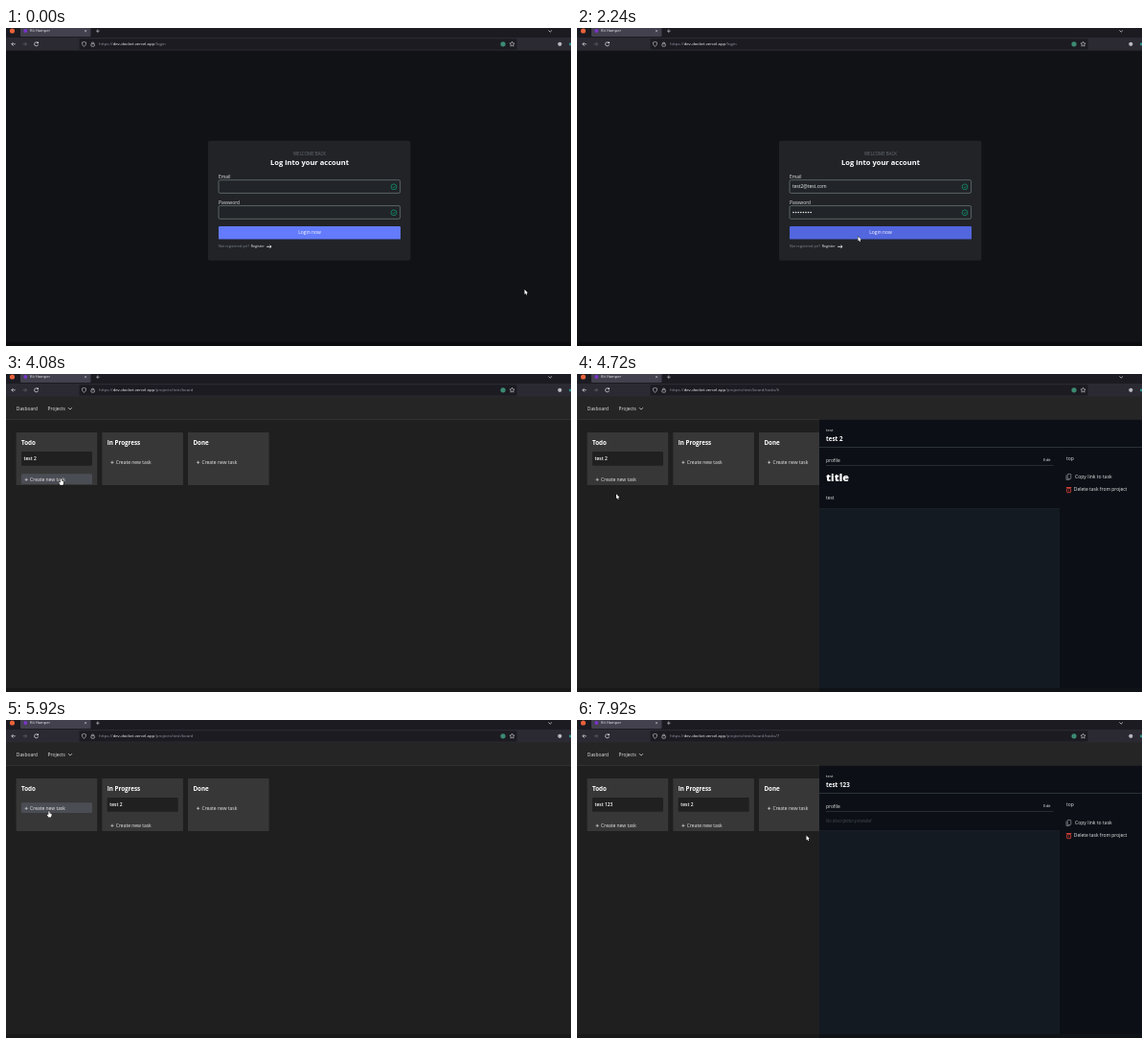
These frames come from a looping animation (590x332 px, 8000 ms). An HTML page with a canvas:

```html
<!DOCTYPE html>
<html lang="en">
<head>
<meta charset="utf-8">
<title>Task board demo</title>
<style>
  html, body { margin: 0; width: 100%; height: 100%; overflow: hidden; background: #111216; }
  canvas { display: block; width: 590px; height: 332px; }
</style>
</head>
<body>
<canvas id="stage"></canvas>
<script>
const W = 590, H = 332, LOOP = 8000, STEP = 80;
const canvas = document.getElementById('stage');
const c = canvas.getContext('2d');
const ratio = window.devicePixelRatio || 1;
canvas.width = W * ratio;
canvas.height = H * ratio;

const FONT = '"Open Sans", "Noto Sans", sans-serif';
const BASE = 4.92;

// Pointer path: time, x, y
const PATH = [
  [0, 541.5, 273], [80, 541.5, 273], [560, 315, 165], [1400, 315, 165],
  [1720, 300, 207], [1920, 293.5, 217.5], [3000, 293.5, 217.5],
  [3440, 58, 93], [3640, 58, 93], [3920, 57.5, 109.5], [4240, 57.5, 109.5],
  [4440, 45, 88], [4560, 45, 88], [4720, 41, 125.2], [5200, 41, 125.2],
  [5440, 42, 88], [5680, 131, 88], [5760, 131, 88], [5920, 45, 95.2],
  [7200, 45, 95.2], [7360, 45, 88], [7520, 45, 88], [7840, 239.5, 120.5], [8000, 239.5, 120.5]
];

const EMAIL = 'test2@test.com';
const NEW_TASK = 'test 123';

const between = (t, a, b) => t >= a && t < b;
const ease = k => k * k * (3 - 2 * k);
const typed = (s, t, start, gap) =>
  s.slice(0, Math.max(0, Math.min(s.length, Math.floor((t - start) / gap) + 1)));

function pointerAt(t) {
  const i = Math.max(1, PATH.findIndex(p => p[0] > t));
  const [t0, x0, y0] = PATH[i - 1], [t1, x1, y1] = PATH[i];
  const k = ease((t - t0) / (t1 - t0));
  return [x0 + (x1 - x0) * k, y0 + (y1 - y0) * k];
}

function rect(x, y, w, h, fill) {
  c.fillStyle = fill;
  c.fillRect(x, y, w, h);
}

function round(x, y, w, h, r, fill, stroke, line = 0.7) {
  c.beginPath();
  c.roundRect(x, y, w, h, r);
  if (fill) { c.fillStyle = fill; c.fill(); }
  if (stroke) { c.strokeStyle = stroke; c.lineWidth = line; c.stroke(); }
}

function circle(x, y, r, fill, stroke, line = 0.7) {
  round(x - r, y - r, 2 * r, 2 * r, r, fill, stroke, line);
}

function lines(points, color, width = 0.7) {
  c.beginPath();
  for (let i = 0; i < points.length; i += 2) c.lineTo(points[i], points[i + 1]);
  c.strokeStyle = color;
  c.lineWidth = width;
  c.stroke();
}

// y is the vertical centre of the lowercase letters; returns the end x
function text(s, x, y, { size = BASE, weight = 400, color = '#e8e8e8', align = 'left', style = '' } = {}) {
  c.font = `${style} ${weight} ${size}px ${FONT}`;
  c.textAlign = align;
  c.textBaseline = 'alphabetic';
  c.fillStyle = color;
  c.fillText(s, x, y + size * 0.32);
  return x + c.measureText(s).width;
}

function arc(x, y, r, from, to, color, width) {
  c.beginPath();
  c.arc(x, y, r, from, to);
  c.strokeStyle = color;
  c.lineWidth = width;
  c.stroke();
}

function browser(path) {
  rect(0, 0, W, 10, '#1c1b22');
  rect(0, 10, W, 13.5, '#2b2a33');
  round(15, -3, 73.5, 12, 1.2, '#42414d');
  circle(6.5, 3, 2.6, '#e8623a');
  circle(20.3, 3, 2, '#7a35c9');
  text('Kit Hamper', 25, 3.2, { size: 4, color: '#f0f0f4' });
  lines([82, 2, 84.2, 4.2], '#d0d0d8', 0.5);
  lines([84.2, 2, 82, 4.2], '#d0d0d8', 0.5);
  lines([94, 3.2, 97.6, 3.2], '#d0d0d8', 0.6);
  lines([95.8, 1.4, 95.8, 5], '#d0d0d8', 0.6);
  lines([566.4, 2.4, 568.2, 4.2, 570, 2.4], '#e0e0e6', 0.7);

  lines([9.8, 16.8, 5.8, 16.8], '#e6e6ec');
  lines([7.6, 15, 5.8, 16.8, 7.6, 18.6], '#e6e6ec');
  lines([17.8, 16.8, 21.4, 16.8], '#696874');
  lines([19.8, 15, 21.6, 16.8, 19.8, 18.6], '#696874');
  arc(31.6, 16.8, 2, 0.2, 5.3, '#e6e6ec', 0.7);
  rect(32.4, 14.6, 1.6, 1.5, '#e6e6ec');

  round(76.5, 11.3, 457, 11.2, 1.2, '#1c1b22');
  c.beginPath();
  c.moveTo(81.5, 14.4);
  c.lineTo(83.7, 15.2);
  c.quadraticCurveTo(83.6, 18.3, 81.5, 19.4);
  c.quadraticCurveTo(79.4, 18.3, 79.3, 15.2);
  c.closePath();
  c.strokeStyle = '#d6d6dc';
  c.lineWidth = 0.6;
  c.stroke();
  round(88.9, 16.4, 3.4, 2.7, 0.4, null, '#d6d6dc', 0.6);
  arc(90.6, 16.2, 1.2, Math.PI, 2 * Math.PI, '#d6d6dc', 0.6);

  const size = 4.3;
  let x = text('https://', 97, 17, { size, color: '#9593a0' });
  x = text('dev-docket.vercel.app', x, 17, { size, color: '#f4f4f8' });
  text(path, x, 17, { size, color: '#9593a0' });

  circle(519, 16.8, 2.6, '#3c8a72');
  c.beginPath();
  for (let i = 0; i < 10; i++) {
    const a = i * Math.PI / 5 - Math.PI / 2, r = i % 2 ? 1.3 : 2.7;
    c.lineTo(528.5 + r * Math.cos(a), 16.9 + r * Math.sin(a));
  }
  c.closePath();
  c.strokeStyle = '#d6d6dc';
  c.lineWidth = 0.6;
  c.stroke();
  circle(578.3, 16.8, 2.1, '#b9b8c2');
  rect(588.2, 15.6, 2, 2.6, '#2f9a95');
}

function check(x, y) {
  circle(x, y, 2.9, null, '#12916a', 0.8);
  lines([x - 1.4, y, x - 0.3, y + 1.1, x + 1.5, y - 1], '#12916a', 0.8);
}

function warn(x, y) {
  c.beginPath();
  c.moveTo(x, y - 3.2);
  c.lineTo(x + 2.8, y - 2.1);
  c.quadraticCurveTo(x + 2.7, y + 2, x, y + 3.3);
  c.quadraticCurveTo(x - 2.7, y + 2, x - 2.8, y - 2.1);
  c.fillStyle = '#e9473f';
  c.fill();
  lines([x, y - 1.5, x, y + 0.4], '#fff', 0.7);
  rect(x - 0.4, y + 1, 0.8, 0.7, '#fff');
}

function field(label, y, focus) {
  text(label, 222, y - 10.4);
  round(222, y - 6.8, 189.6, 13.7, 1.6, '#212428', focus ? '#3f7cf2' : '#73817d', focus ? 1.1 : 0.7);
}

function login(t) {
  rect(0, 23.5, W, H, '#111216');
  rect(0, 328, W, 4, '#0c0c0f');
  round(211, 117.8, 211.4, 125, 2, '#212327');
  text('WELCOME BACK', 317, 131.5, { size: 4.5, color: '#6c7077', align: 'center' });
  text('Log into your account', 317, 140.6, { size: 7.55, weight: 700, color: '#fff', align: 'center' });

  const onEmail = between(t, 560, 1360), onPass = between(t, 1360, 1840);
  field('Email', 165.5, onEmail);
  field('Password', 192.4, onPass);

  const mail = t < 640 ? '' : t < 1120 ? typed(EMAIL, t, 640, 80) : typed(EMAIL, t, 1120 - 6 * 26, 26);
  let end = text(mail, 225, 165.6, { color: '#f2f2f2' });
  if (onEmail) lines([end + 0.5, 162.5, end + 0.5, 168.6], '#fff', 0.6);

  const dots = t < 1360 ? 0 : Math.min(8, Math.floor((t - 1360) / 40) + 1);
  for (let i = 0; i < dots; i++) circle(226 + i * 2.6, 192.5, 0.8, '#f2f2f2');
  if (onPass) lines([225.4 + dots * 2.6, 189.4, 225.4 + dots * 2.6, 195.4], '#fff', 0.6);

  const bad = mail.length > 0 && mail.length < EMAIL.length;
  if (bad) {
    round(355, 141.2, 57, 9.6, 1.2, '#fa634b');
    text('Please provide valid email', 383.5, 146.1, { size: 4.25, color: '#fff', align: 'center' });
    warn(405, 165.8);
  } else {
    check(405, 165.8);
  }
  check(405, 192.8);

  round(222, 207, 190, 13.6, 1.2, between(t, 1920, 2720) ? '#5266de' : '#637bfc');
  text('Login now', 317, 213.9, { color: '#fff', align: 'center' });
  text('Not registered yet?', 222, 228, { size: 3.65, color: '#858990' });
  text('Register', 255.7, 228, { size: 3.69, color: '#f0f0f0' });
  lines([272.2, 228.3, 277, 228.3], '#fff', 0.8);
  lines([275.5, 226.9, 277.1, 228.3, 275.5, 229.7], '#fff', 0.8);
}

function appShell() {
  rect(0, 23.5, W, H, '#1f1f1f');
  rect(0, 328, W, 4, '#1a191a');
  rect(0, 23.5, W, 24, '#252525');
  rect(0, 47.2, W, 0.7, '#383838');
  text('Dasboard', 10.8, 36.2);
  text('Projects', 43.6, 36.2);
  lines([65, 35.1, 67, 37.1, 69, 35.1], '#e8e8e8', 0.7);
}

function dashboard(t) {
  appShell();
  text('Your projects', 9.2, 63.2, { size: 7.38, color: '#f0f0f0' });
  round(582, 57, 20, 21, 1.4, '#637bfc');
  round(9.4, 85, 600, 20.4, 1, null, '#667471', 0.7);
  if (t < 3120) {
    const a = (t - 2960) / 750 * Math.PI * 2 + 1;
    arc(19, 94.4, 3.6, a, a + 4, '#2a66dc', 1.1);
  } else {
    text('test', 16, 95.2, { color: '#f0f0f0' });
  }
}

function toast(t) {
  if (!between(t, 2480, 3840)) return;
  const enter = Math.min(1, (t - 2400) / 320), leave = Math.max(0, (t - 3600) / 240);
  const x = 524 + 66 * (Math.pow(1 - enter, 2) + leave * leave);
  round(x, 30.3, 98, 20.6, 1.2, '#fff');
  text('You have successfully logged in', x + 15, 41, { color: '#757575' });
  rect(x, 49.6, 98, 1.4, '#16bb20');
}

function card(x, y, label, caret) {
  round(x, y, 74, 14.8, 1, '#202020');
  const end = text(label, x + 2.6, y + 7, { weight: 600, color: '#fff' });
  if (caret) lines([end + 0.5, y + 4.2, end + 0.5, y + 10], '#fff', 0.5);
}

function column(i, title, tasks, hover, caret) {
  const x = 10.6 + i * 89.7;
  rect(x, 61, 84.6, 55, '#373737');
  text(title, x + 5.4, 72, { size: 6.25, weight: 700, color: '#fff' });
  tasks.forEach(s => card(x + 5.4, 81, s, caret));
  const y = tasks.length ? 109.8 : 91.8;
  if (hover) round(x + 5.4, y - 5.6, 74, 10.8, 1.2, '#4b4d55');
  lines([x + 9, y + 0.5, x + 12.2, y + 0.5], '#e8e8e8', 0.6);
  lines([x + 10.6, y - 1.1, x + 10.6, y + 2.1], '#e8e8e8', 0.6);
  text('Create new task', x + 14.5, y + 0.3, { size: 4.98 });
}

function board(t, x, y) {
  appShell();
  if (t < 3720) return;
  const dragging = between(t, 5440, 5740);
  const typing = between(t, 6320, 7120);
  const todo = t < 5440 ? ['test 2'] : t < 6320 ? [] : [typed(NEW_TASK, t, 6400, 72)];
  const progress = t >= 5740 ? ['test 2'] : [];
  const hover = between(t, 3880, 4320) || between(t, 5840, 6320);
  column(0, 'Todo', todo, hover, typing);
  column(1, 'In Progress', progress);
  column(2, 'Done', []);
  if (dragging) card(x - 26, y - 7, 'test 2');
}

function panel(title, done) {
  const split = done ? 140 : 115;
  rect(253, 47.5, 337, 284.5, '#0c1016');
  rect(253, split, 251, H - split, '#141a21');
  rect(253, split, 251, 0.6, '#1d242c');
  rect(253, 76.2, 337, 0.7, '#3a4047');
  rect(253, 328, 337, 4, '#0f1318');
  text('test', 260, 58.5, { size: 4.3 });
  text(title, 260, 67.7, { size: 6.3, weight: 700, color: '#fff' });
  text('profile', 260, 90);
  text('Edit', 487, 90, { size: 4.3 });
  rect(260, 95.2, 237.5, 0.6, '#3a4047');
  if (done) {
    text('title', 260, 108.8, { size: 11, weight: 800, color: '#fff' });
    text('test', 260, 129.8);
  } else {
    text('No description provided', 260, 105.6, { size: 4.5, color: '#454b53', style: 'italic' });
  }
  text('top', 511, 88);
  round(512.2, 104.4, 3.6, 5, 0.5, null, '#a8adb4', 0.6);
  lines([511, 105.6, 511, 110.4, 514.4, 110.4], '#a8adb4', 0.6);
  text('Copy link to task', 520, 107.4, { size: 5.08 });
  round(511.6, 119.4, 4, 4.3, 0.5, null, '#e0453c', 0.8);
  lines([510.9, 118.5, 516.3, 118.5], '#e0453c', 0.9);
  lines([513.6, 120.5, 513.6, 122.6], '#e0453c', 0.6);
  text('Delete task from project', 518.8, 120.8, { size: 4.96 });
}

function shape(points, x, y) {
  c.beginPath();
  for (let i = 0; i < points.length; i += 2) c.lineTo(x + points[i], y + points[i + 1]);
  c.closePath();
  c.lineJoin = 'round';
  c.strokeStyle = '#111';
  c.lineWidth = 0.8;
  c.stroke();
  c.fillStyle = '#fff';
  c.fill();
}

function pointer(t, x, y) {
  const beam = between(t, 520, 1480);
  const hand = between(t, 3360, 3640) || between(t, 3800, 4600) ||
    between(t, 5400, 7560);
  if (beam) {
    lines([x, y - 2.8, x, y + 2.8], '#aeb3ba', 0.5);
    lines([x - 0.9, y - 2.9, x + 0.9, y - 2.9], '#aeb3ba', 0.4);
    lines([x - 0.9, y + 2.9, x + 0.9, y + 2.9], '#aeb3ba', 0.4);
  } else if (hand) {
    shape([-0.6, 0, 0.4, 0, 0.5, 2, 2.6, 2.7, 2.6, 4.8, 1.8, 6.4, -0.7, 6.4, -2.3, 3.8, -1.7, 3.2, -0.7, 4], x, y);
  } else {
    shape([0, 0, 0, 4.9, 1.1, 4, 1.9, 5.7, 2.7, 5.3, 2, 3.7, 3.4, 3.6], x, y);
  }
}

function pathAt(t) {
  if (t < 2560) return '/login';
  if (t < 3640) return '/dashboard';
  if (between(t, 4560, 5200)) return '/projects/test/board/tasks/6';
  return '/projects/test/board' + (t >= 7520 ? '/tasks/7' : '');
}

function draw(t) {
  const [x, y] = pointerAt(t);
  c.setTransform(ratio, 0, 0, ratio, 0, 0);
  if (t < 2720) login(t);
  else if (t < 3640) dashboard(t);
  else board(t, x, y);
  toast(t);
  if (between(t, 4560, 5200)) panel('test 2', true);
  if (t >= 7520) panel(NEW_TASK, false);
  browser(pathAt(t));
  pointer(t, x, y);
}

const start = performance.now();
function tick() {
  const t = (performance.now() - start) % LOOP;
  draw(Math.floor(t / STEP) * STEP);
  requestAnimationFrame(tick);
}
tick();
</script>
</body>
</html>
```
